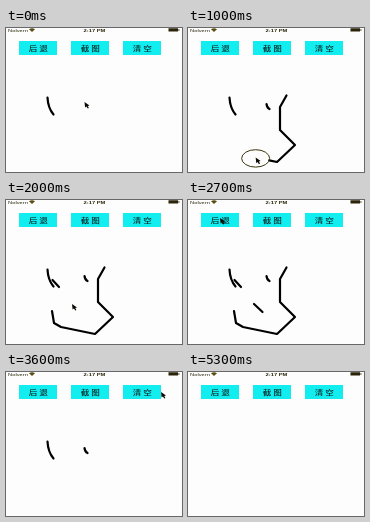
An HTML page that plays this animation: 176 by 144 pixels, repeating every 5.5 s.

```html
<!DOCTYPE html>
<html lang="zh-CN">
<head>
<meta charset="utf-8">
<style>
  html, body { margin: 0; height: 100%; overflow: hidden; background: #fdfdfe; }
  svg { display: block; width: 100vw; height: 100vh; }
  .status { font: 5.8px "Liberation Sans", sans-serif; fill: #2a2508; }
  .label { font: 8.6px "Noto Sans CJK SC", "Noto Sans CJK", sans-serif; text-anchor: middle; }
  #lines { fill: none; stroke: #000; stroke-width: 2.2; stroke-linecap: round; stroke-linejoin: round; }
</style>
</head>
<body>
<svg viewBox="0 0 176 144">
  <!-- The recorded screen is squashed vertically -->
  <g class="status" transform="scale(1 .75)">
    <text x="2" y="4.9">Nolvern</text>
    <text x="88.5" y="4.9" text-anchor="middle" font-weight="bold">2:17 PM</text>
    <path d="M23 1.8Q26 -1 29 1.8L26 5.4Z" fill="#5a4d10"/>
    <path d="M162.5 .4h9.5v4.4h-9.5zM172.4 1.6h1v2h-1z"/>
  </g>
  <g id="buttons"></g>
  <g id="lines"></g>
  <ellipse id="ring" rx="14" ry="8.7" fill="none" stroke="#3a3408"/>
  <path id="cursor" d="M0 0L.6 5.6L1.9 4.4L3.3 6.6L4.4 6L3.2 3.9L5 3.5Z" fill="#0c0a02"/>
</svg>
<script>
const LOOP = 5500, STEP = 100, LAG = 80, HIDE = 4700;
const $ = id => document.getElementById(id);

function set(el, attrs) {
  for (const key in attrs) el.setAttribute(key, attrs[key]);
  return el;
}

function add(parent, tag, attrs, text = '') {
  const el = set(document.createElementNS('http://www.w3.org/2000/svg', tag), attrs);
  el.textContent = text;
  return parent.appendChild(el);
}

const show = (el, on) => set(el, { visibility: on ? 'visible' : 'hidden' });

['后 退', '截 图', '清 空'].forEach((name, i) => {
  const x = 13 + i * 52;
  add($('buttons'), 'rect', { x, y: 13, width: 38, height: 14, fill: '#12eef0' });
  add($('buttons'), 'text', { class: 'label', transform: `translate(${x + 19.3} 22.5) scale(1 .75)` }, name);
});

// The pointer follows one move after another; strokes leave a line until removed
const moves = [];

function stroke(from, to, d, gone) {
  const path = add($('lines'), 'path', { d });
  moves.push({ from, to, gone, path, length: path.getTotalLength() });
}

function glide(from, to, target) {
  const { path, length } = moves[moves.length - 1];
  const { x, y } = path.getPointAtLength(length);
  stroke(from, to, `M${x} ${y}L${target}`, 0);
}

stroke(-300, -100, 'M41.5 69.5Q42 80 47.5 86.5', 4200);
glide(-100, 0, '78.5 74');
stroke(50, 250, 'M78.5 76Q79 80 81.5 81', 4200);
glide(250, 400, '98.5 67.5');
stroke(550, 1280, 'M98.5 67.5L92 79V102L107 117L89 134L55 127L48 123L46 111', 3300);
glide(1450, 1650, '46.5 80');
stroke(1700, 1900, 'M46.5 80L53 87', 3200);
glide(1900, 2000, '66 104');
stroke(2000, 2150, 'M66 104L74.5 112', 2900);
glide(2150, 2300, '79 35');
glide(2300, 2700, '32 18');
glide(3300, 3600, '155 20');
glide(3700, 3800, '126 21');
glide(4000, 4400, '130.5 20');
glide(4500, 4600, '136 19');

function progress({ from, to }, t) {
  const k = Math.min(1, Math.max(0, (t - from) / (to - from)));
  return k * (1.6 - 0.6 * k);
}

function draw(now) {
  const t = Math.floor(now % LOOP / STEP) * STEP;
  for (const move of moves) {
    const drawn = t < move.to ? progress(move, t - LAG) : 1;
    const dash = drawn * move.length;
    set(move.path, { 'stroke-dasharray': `${dash} 999` });
    show(move.path, dash > 0 && t < move.gone);
  }
  const current = moves.filter(move => move.from <= t).pop();
  const { x, y } = current.path.getPointAtLength(progress(current, t) * current.length);
  set($('ring'), { cx: x, cy: y + 0.8 });
  set($('cursor'), { transform: `translate(${x} ${y})` });
  show($('ring'), current.gone && t > current.from && t < current.to);
  show($('cursor'), t < HIDE);
}

const start = performance.now();
function tick() {
  draw(performance.now() - start);
  requestAnimationFrame(tick);
}
tick();
</script>
</body>
</html>
```
